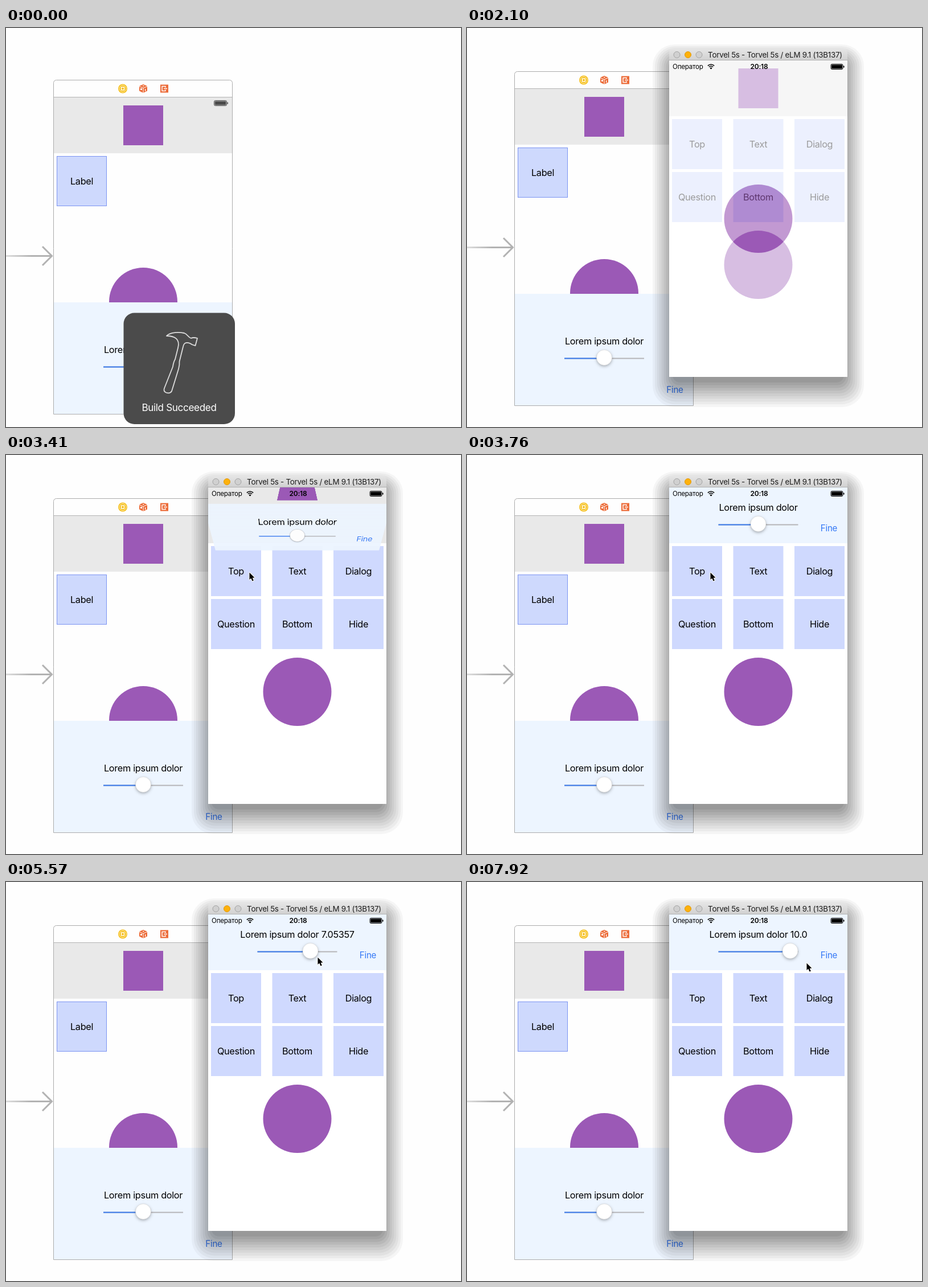
Animation of 799 by 701 pixels, one loop 8000 ms. Source, as an HTML page with a canvas:

```html
<!DOCTYPE html>
<html lang="en">
<head>
<meta charset="utf-8">
<title>Panel demo</title>
<style>
html, body { margin: 0; width: 100%; height: 100%; overflow: hidden; background: #fff; }
canvas { display: block; width: 799px; height: 701px; }
</style>
</head>
<body>
<canvas id="stage"></canvas>
<script>
const W = 799, H = 701, LOOP = 8000, DPR = window.devicePixelRatio || 1;
const PURPLE = '#9b59b6', BLUE = '#3478f6', PANEL = '#edf5ff', HEADER = '#e9e9e9';
const PHONE = { x: 355, y: 57, w: 313, h: 556, head: 98 };
const FONT = 'Inter, "Open Sans", sans-serif';
const BODY = 16.3;

function surface(w, h, scale) {
  const el = document.createElement('canvas');
  el.width = w * scale;
  el.height = h * scale;
  return el;
}

const stage = document.getElementById('stage');
stage.width = W * DPR;
stage.height = H * DPR;
const layer = surface(W, H, DPR);
const SS = 2;
const sheet = surface(PHONE.w, PHONE.head, SS);
let c = stage.getContext('2d');

const clamp = v => Math.max(0, Math.min(1, v));
const mix = (a, b, k) => a + (b - a) * k;

// keys: [time, value...], smooth between neighbours
function track(keys, t) {
  let i = 0;
  while (i < keys.length - 2 && t >= keys[i + 1][0]) i++;
  const a = keys[i], b = keys[i + 1];
  const u = clamp((t - a[0]) / (b[0] - a[0]));
  const k = u * u * (3 - 2 * u);
  return a.slice(1).map((v, n) => mix(v, b[n + 1], k));
}

const cursorKeys = [
  [2330, 478, 664], [2770, 438, 210], [2890, 438, 210], [3060, 427, 206],
  [4590, 427, 206], [5130, 513, 123], [5230, 513, 123], [5390, 529, 128],
  [5570, 547, 132], [5740, 547, 132], [5750, 549, 131], [6860, 549, 131],
  [6880, 551, 133], [6930, 551, 133], [7630, 597, 142], [7900, 597, 142], [7920, 596, 142]
];
const valueKeys = [
  [5230, 5], [5390, 6], [5570, 7.05357], [5740, 7.05357], [5750, 7.14286],
  [6860, 7.14286], [6880, 7.27891], [6930, 7.27891], [7560, 10]
];

// run a drawing on another canvas
function drawOn(el, scale, fn) {
  const main = c;
  c = el.getContext('2d');
  c.setTransform(scale, 0, 0, scale, 0, 0);
  fn();
  c = main;
}

function rect(x, y, w, h, fill) {
  c.fillStyle = fill;
  c.fillRect(x, y, w, h);
}

function round(x, y, w, h, r) {
  c.beginPath();
  c.roundRect(x, y, w, h, r);
}

function disc(x, y, r, fill, line) {
  c.beginPath();
  c.arc(x, y, r, 0, 7);
  c.fillStyle = fill;
  c.fill();
  if (line) {
    c.strokeStyle = line;
    c.lineWidth = 1;
    c.stroke();
  }
}

function path(points, close) {
  c.beginPath();
  for (const [x, y] of points) c.lineTo(x, y);
  if (close) c.closePath();
}

function line(points, color, width) {
  path(points);
  c.strokeStyle = color;
  c.lineWidth = width;
  c.stroke();
}

function text(s, x, y, size, fill = '#000', align = 'center', weight = 400) {
  c.font = `${weight} ${size}px ${FONT}`;
  c.letterSpacing = (-0.02 * size).toFixed(2) + 'px';
  c.textAlign = align;
  c.fillStyle = fill;
  c.fillText(s, x, y + size * 0.364);
}

const mark = (x, y) => rect(x - 35, y - 35, 70, 70, PURPLE);

function slider(x, y, value, label) {
  const knob = x - 56 + value * 11.2;
  text(label, x, y - 30, BODY);
  rect(x - 70, y - 0.5, 140, 2, '#b5b5b8');
  rect(x - 70, y - 0.5, knob - x + 70, 2, '#3b7cf0');
  c.save();
  c.shadowColor = 'rgba(0,0,0,.3)';
  c.shadowBlur = 5 * DPR;
  c.shadowOffsetY = 2 * DPR;
  disc(knob, y - 1, 13.5, '#fff');
  c.restore();
  disc(knob, y - 1, 13.5, '#fff', 'rgba(0,0,0,.1)');
}

function battery(x, y, w, h, color) {
  c.strokeStyle = color;
  c.lineWidth = 1;
  round(x + 0.5, y + 0.5, w - 3, h - 1, 2);
  c.stroke();
  rect(x + 1.6, y + 1.6, w - 5.2, h - 3.2, color);
  rect(x + w - 1.5, y + h / 2 - 1.5, 1.5, 3, color);
}

function sceneIcons() {
  disc(205, 106.5, 8, '#f5bd17');
  disc(205, 106.5, 6, '#f5bd17', '#fff3c0');
  c.strokeStyle = '#fff';
  c.lineWidth = 1.4;
  c.strokeRect(202.5, 104, 5, 5);

  const orange = '#ec6b38';
  c.fillStyle = orange;
  path([[241, 99], [248, 102], [248, 110.5], [241, 114], [234, 110.5], [234, 102]], true);
  c.fill();
  line([[234, 102.5], [241, 105.5], [248, 102.5]], '#fff', 1);
  line([[241, 105.5], [241, 114]], '#fff', 1);
  rect(236, 106, 3, 3, '#fff');
  rect(244, 107, 1.3, 4, '#fff');
  rect(240, 101, 2.5, 1.3, '#fff');

  rect(271, 99.5, 14, 14, orange);
  line([[280, 104.5], [280, 102.5], [274, 102.5], [274, 110.5], [280, 110.5], [280, 108.5]], '#fff', 1.5);
  line([[277, 106.5], [283, 106.5]], '#fff', 1.5);
}

function storyboard(dy) {
  c.save();
  c.translate(0, dy);

  const fade = c.createLinearGradient(0, 0, 45, 0);
  fade.addColorStop(0, '#dedede');
  fade.addColorStop(1, '#b2b2b2');
  rect(0, 399, 80, 3, fade);
  line([[64, 384], [80.5, 400.5], [64, 417]], '#b2b2b2', 3);

  rect(84, 122, 313, 98, HEADER);
  rect(84, 121, 313, 1, '#b4b4b4');
  sceneIcons();
  mark(241, 171);
  battery(365, 127, 25, 10, '#4a4a4a');

  rect(89, 225, 88, 88, '#ced9fd');
  c.strokeStyle = '#7b93f2';
  c.lineWidth = 1;
  c.strokeRect(89.5, 225.5, 87, 87);
  text('Label', 133, 269, BODY);

  disc(241, 481, 60, PURPLE);
  rect(84, 482, 313, 196, PANEL);
  slider(241, 595, 5, 'Lorem ipsum dolor');
  text('Fine', 365, 650, 15.2, BLUE);

  c.strokeStyle = '#acacac';
  c.lineWidth = 1;
  round(83.5, 91.5, 314, 587, [5, 5, 0, 0]);
  c.stroke();
  c.restore();
}

// stepped window shadow, outer band first
function shadow() {
  const n = 10;
  for (let i = n; i > 0; i--) {
    const k = i / n;
    c.fillStyle = `rgba(0,0,0,${0.036 + 0.03 * (1 - k)})`;
    round(365 - 39 * k, 60 - 31 * k, 293 + 78 * k, 558 + 79 * k, 10 + 28 * k);
    c.fill();
  }
}

function statusBar() {
  text('Оператор', 361, 68, 11.6, '#000', 'left');
  text('20:18', 513, 68, 12, '#000', 'center', 600);
  battery(638.5, 63, 24, 10, '#000');
  c.strokeStyle = '#000';
  c.lineWidth = 1.6;
  for (const r of [8, 5]) {
    c.beginPath();
    c.arc(428.5, 72, r, -Math.PI * 0.75, -Math.PI * 0.25);
    c.stroke();
  }
  c.fillStyle = '#000';
  c.beginPath();
  c.moveTo(428.5, 72.5);
  c.arc(428.5, 72.5, 3, -Math.PI * 0.75, -Math.PI * 0.25);
  c.fill();
}

function headFace() {
  rect(0, 0, PHONE.w, PHONE.head, HEADER);
  mark(156.5, 49);
}

function panelFace(value, label) {
  rect(0, 0, PHONE.w, PHONE.head, PANEL);
  slider(156.5, 65, value, label);
  text('Fine', 280.5, 71.5, 15.2, BLUE);
}

// one side of a cube turning about the horizontal axis
function cubeFace(face, angle) {
  const half = PHONE.head / 2, depth = 330;
  drawOn(sheet, SS, face);
  const sin = Math.sin(angle), cos = Math.cos(angle);
  const project = v => {
    const s = depth / (depth - (v * sin + half * cos - half));
    return [half + (v * cos - half * sin) * s, s];
  };
  for (let i = 0; i < sheet.height; i++) {
    const [y0, s] = project(i / SS - half);
    const [y1] = project((i + 1) / SS - half);
    if (y1 <= y0) continue;
    const w = PHONE.w * s;
    c.drawImage(sheet, 0, i, sheet.width, 1, (PHONE.w - w) / 2, y0, w, y1 - y0 + 0.4);
  }
}

function header(t) {
  c.save();
  c.translate(PHONE.x, PHONE.y);
  const u = t < 3240 ? 0 : clamp((t - 3200) / 560);
  const turn = (1 - Math.pow(1 - u, 2.4)) * Math.PI / 2;
  if (u === 0) headFace();
  else if (u < 1) {
    rect(0, 0, PHONE.w, PHONE.head, HEADER);
    cubeFace(headFace, turn);
    cubeFace(() => panelFace(5, 'Lorem ipsum dolor'), turn - Math.PI / 2);
  } else {
    const [v] = track(valueKeys, t);
    const num = t < 5240 ? '' : v >= 10 ? ' 10.0' : ' ' + v.toFixed(5);
    panelFace(v, 'Lorem ipsum dolor' + num);
  }
  c.restore();
}

function menu(t) {
  rect(PHONE.x, PHONE.y, PHONE.w, PHONE.h, '#fff');
  disc(511.5, 416, 60, PURPLE);
  ['Top', 'Text', 'Dialog', 'Question', 'Bottom', 'Hide'].forEach((name, i) => {
    const x = 360 + (i % 3) * 107.5, y = 160 + (i > 2 ? 93 : 0);
    rect(x, y, 88, 88, '#cfd9fe');
    text(name, x + 44, y + 44.5, BODY);
  });
  header(t);
}

function simulator(t) {
  shadow();
  const bar = c.createLinearGradient(0, 36, 0, 57);
  bar.addColorStop(0, '#e6e6e6');
  bar.addColorStop(1, '#d0d0d0');
  c.fillStyle = bar;
  round(355, 36, 313, 22, [5, 5, 0, 0]);
  c.fill();
  rect(355, 56, 313, 1, '#b2b2b2');
  disc(368.5, 47, 5.5, '#d0d0d0', '#a3a3a3');
  disc(388, 47, 5.5, '#fdb10c', '#e09a10');
  disc(407.5, 47, 5.5, '#d0d0d0', '#a3a3a3');
  text('Torvel 5s - Torvel 5s / eLM 9.1 (13B137)', 541, 47.3, 13.4, '#1c1c1c');

  c.save();
  c.beginPath();
  c.rect(PHONE.x, PHONE.y, PHONE.w, PHONE.h);
  c.clip();
  const shown = t < 2040 ? 0 : clamp((t - 2000) / 260);
  if (shown < 1) {
    rect(PHONE.x, PHONE.y, PHONE.w, PHONE.h, '#fff');
    disc(511.5, 335, 60, PURPLE);
    drawOn(layer, DPR, () => menu(t));
    c.globalAlpha = shown;
    c.drawImage(layer, 0, 0, W, H);
    c.globalAlpha = 1;
  } else menu(t);
  statusBar();
  c.restore();
}

function hud(alpha) {
  c.save();
  c.globalAlpha = alpha;
  c.fillStyle = '#4b4b4b';
  round(206.5, 500.5, 195.5, 195.5, 19);
  c.fill();
  c.strokeStyle = '#dcdcdc';
  c.lineWidth = 1.8;
  c.lineJoin = 'round';
  c.beginPath();
  c.moveTo(282, 541);
  c.bezierCurveTo(289, 534, 304, 534, 313, 536);
  c.bezierCurveTo(319, 538, 319, 543, 325, 545);
  c.quadraticCurveTo(329, 543, 336, 545);
  c.lineTo(332.5, 558);
  c.quadraticCurveTo(327, 557, 323, 554);
  c.quadraticCurveTo(313, 550, 311, 560);
  c.lineTo(304.5, 586);
  c.quadraticCurveTo(305, 592, 303, 599);
  c.lineTo(291, 638);
  c.quadraticCurveTo(288, 643, 281, 640.5);
  c.quadraticCurveTo(276, 638, 278, 633);
  c.lineTo(293, 595);
  c.quadraticCurveTo(294, 587, 297, 582);
  c.lineTo(302, 562);
  c.bezierCurveTo(306, 547, 297, 541, 282, 541);
  c.closePath();
  c.stroke();
  text('Build Succeeded', 304, 666.5, 17.1, '#fff');
  c.restore();
}

function cursor(t) {
  const [x, y] = track(cursorKeys, t);
  c.save();
  c.translate(x, y);
  path([[0.5, 0.5], [0.5, 13], [3.3, 10.6], [5.5, 15.6], [7.8, 14.6], [5.7, 9.8], [9.5, 9.6]], true);
  c.lineJoin = 'round';
  c.strokeStyle = '#fff';
  c.lineWidth = 2;
  c.stroke();
  c.fillStyle = '#000';
  c.fill();
  c.restore();
}

function draw(t) {
  c.setTransform(DPR, 0, 0, DPR, 0, 0);
  rect(0, 0, W, H, '#fefefe');
  storyboard(t < 1680 ? 0 : -15);
  if (t >= 1320) simulator(t);
  const left = t < 1680 ? 1 : t < 1860 ? 1 - (t - 1620) / 240 : 0;
  if (left > 0) hud(left);
  if (t >= 2330) cursor(t);
}

const start = performance.now();
function tick() {
  draw((performance.now() - start) % LOOP);
  requestAnimationFrame(tick);
}
tick();
</script>
</body>
</html>
```
